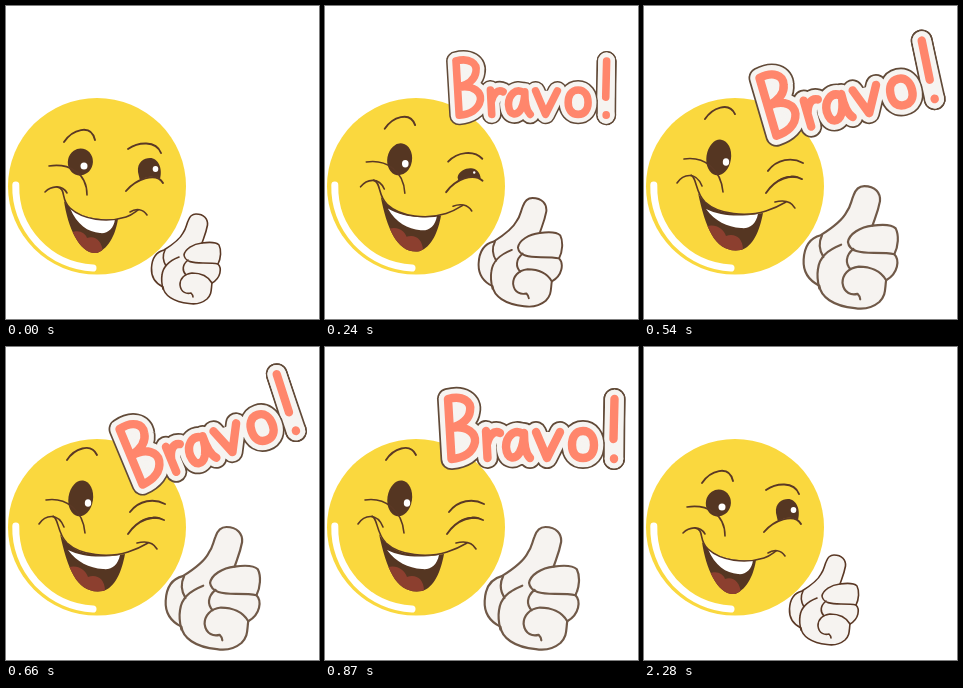
These frames come from a looping animation (313 px wide and 313 px high, 2310 ms). An HTML page:

```html
<!DOCTYPE html>
<html lang="en">
<head>
<meta charset="utf-8">
<title>Bravo!</title>
<style>
  html, body { margin: 0; width: 100%; height: 100%; overflow: hidden; background: #fff; }
  svg { display: block; width: 100vw; height: 100vh; }
  .line { fill: none; stroke: #5a3825; }
  .dark { fill: #553622; }
  path, ellipse { stroke-linecap: round; stroke-linejoin: round; }
</style>
</head>
<body>
<svg viewBox="0 0 313 313" role="img" aria-label="Bravo!">
  <defs>
    <path id="word" d="M123 52L126.500 112M123 52C138 48 147 55 145 64C144 73 136 78 126 81C143 78 151 87 150 95C148 106 138 111 126.500 112
      M161 84L162.500 111M162 97C164 88 169 83 175 86
      M198 87C189 81 181 90 181 100C182 113 190 113 195 105C198 99 199 92 199 86C199 97 200 106 205 111
      M211 85L222 111L235 85
      M258 84C250 84 247 91 247 98C247 106 251 111 258 111C265 111 269 106 269 98C269 90 265 84 258 84Z
      M289.500 52L288.500 92M289 111.500V112"/>
    <g id="plate"><use href="#word"/><path d="M289.500 52L289 112"/></g>
    <clipPath id="mouthClip"><path id="clipShape"/></clipPath>
  </defs>

  <ellipse cx="91" cy="180.3" rx="89" ry="88.3" fill="#fad83e"/>
  <path d="M9.800 179A81 81 0 0 0 87 262" fill="none" stroke="#fff" stroke-width="7"/>

  <ellipse id="eye" class="dark"/>
  <ellipse id="glint" fill="#fff"/>
  <path id="wink" class="dark"/>
  <ellipse id="glint2" fill="#fff"/>
  <path id="mouth" class="dark"/>
  <g clip-path="url(#mouthClip)">
    <path id="tongue" fill="#8c3f2f"/>
    <path id="teeth" fill="#fff"/>
  </g>
  <g class="line" stroke-width="1.6">
    <path id="lip"/>
    <path id="tickL"/>
    <path id="tickR"/>
    <path id="browL" stroke-width="1.9"/>
    <path id="browR" stroke-width="1.9"/>
    <path id="lidL"/>
    <path id="lidR" stroke-width="1.9"/>
  </g>

  <g id="hand" class="line" stroke-width="1.6">
    <path fill="#f6f3f0" d="M182 215C184 209 187 208 190 208C198 208 202 213 201.500 219C200 227 198 231 196 237C203 236 210 236 213 239
      C215.500 244 215 252 212 258C216 262 215 272 206 277C205 284 206 288 201 293C195 298 189 298.500 183 297.500C167 296 158 289 157 281
      C149 277 145 271 145.500 262C146 252 150 246 158 244C166 239 174 233 177 227C180 223 180 220 182 215Z"/>
    <path d="M196 237C187 238 179 243 178 249C179 256 187 257 197 257C203 257 208 257 212 258
      M182 254C176 259 176 265 180 269
      M206 277C202 270 194 267 186 267C178 268 174 273 174 279C175 287 181 288 185 287C186 288 187 290 187 291
      M159 244C156 250 157 255 160 260M173 251C163 255 157 260 156 269C155 275 156 279 157 283"/>
  </g>

  <g id="bravo">
    <use href="#plate" fill="#614a38" stroke="#614a38" stroke-width="22"/>
    <use href="#plate" fill="#f6f4f1" stroke="#f6f4f1" stroke-width="18.6"/>
    <use href="#word" fill="none" stroke="#ff866c" stroke-width="8.4"/>
  </g>
</svg>
<script>
const LOOP = 2310, STEP = 30;
const el = id => document.getElementById(id);
const clamp = x => Math.max(0, Math.min(1, x));
const lerp = (a, b, p) => a + (b - a) * p;
const span = (t, a, b) => clamp((t - a) / (b - a));

// Resting and cheering outlines; each pair has the same commands.
const mouthShape = [
  'M58 195C67 209 86 215 112 213C110 226 104 242 91 247C74 249 62 222 58 195Z',
  'M54 187C64 206 90 212 119 207C116 224 109 241 97 244C72 248 62 224 54 187Z'
];
const shapes = {
  mouth: mouthShape,
  clipShape: mouthShape,
  teeth: [
    'M64 202C76 211 92 215 109 213C108 223 101 228 94 227C82 226 71 219 64 202Z',
    'M62 203C76 210 94 211 114 208C112 218 106 223 97 222C83 221 71 215 62 203Z'
  ],
  tongue: [
    'M64 227C73 223 79 227 81 232C89 229 96 235 97 246L80 252Z',
    'M58 222C69 216 79 221 82 230C90 227 99 231 99 244L82 252Z'
  ],
  lip: [
    'M51 181C61 183 54 193 64 202C77 214 101 217 120 211C126 209 129 206 132 204',
    'M47 169C53 172 51 186 61 196C75 209 103 211 122 205C131 202 137 199 142 196'
  ],
  tickL: [
    'M39 186C45 180 56 178 61 187',
    'M33 177C39 168 52 165 58 180'
  ],
  tickR: [
    'M124 206C130 202 137 203 141 209',
    'M131 196C139 194 147 195 151 202'
  ],
  browL: [
    'M58 136C66 124 85 117 89 134',
    'M61 113C68 102 85 95 91 108'
  ],
  browR: [
    'M122 143C132 136 150 134 155 147',
    'M124 165C133 153 148 151 159 157'
  ],
  lidL: [
    'M43 160C62 157 81 166 81 189',
    'M40 153C60 150 77 163 79 186'
  ],
  lidR: [
    'M120 185C129 174 150 165 157 177',
    'M122 187C132 172 147 168 158 173'
  ],
  wink: [
    'M132 166C131 156 138 152 144 152C152 152 157 162 154 173C147 169 138 171 134 175Z',
    'M133 175C136 172 142 170 146 170C150 169 154 170 157 172C150 171 140 172 133 175Z'
  ]
};

// cx, cy, rx, ry
const ovals = {
  eye: [[75, 156, 12.5, 13.5], [74.5, 151.5, 12.3, 18]],
  glint: [[78, 160, 3.5, 3.5], [82, 156, 3.2, 3.8]],
  glint2: [[149.500, 163, 2.8, 3], [149, 169, 0, 0]]
};

function morph([a, b], p) {
  const to = b.match(/[\d.]+/g);
  let i = 0;
  return a.replace(/[\d.]+/g, n => lerp(+n, +to[i++], p).toFixed(2));
}

function track(keys, t) {
  for (let i = 1; i < keys.length; i++) {
    const [t0, a] = keys[i - 1], [t1, b] = keys[i];
    if (t <= t1) return lerp(a, b, span(t, t0, t1));
  }
  return keys[keys.length - 1][1];
}

const tilt = [[420, 0], [540, -13], [600, -19.5], [630, -22], [750, -11], [870, 0]];

function draw(time) {
  const t = Math.floor((time % LOOP) / STEP) * STEP;
  const leaving = t >= 2070;
  const out = span(t, 2070, 2280);

  const p = leaving ? Math.cos(out * Math.PI / 2)
                    : Math.sin(span(t, 30, 570) * Math.PI / 2);
  for (const id in shapes) el(id).setAttribute('d', morph(shapes[id], p));
  for (const id in ovals) {
    const [a, b] = ovals[id];
    ['cx', 'cy', 'rx', 'ry'].forEach((k, i) => el(id).setAttribute(k, lerp(a[i], b[i], p)));
  }
  el('eye').setAttribute('transform', `rotate(${lerp(12, 8, p)} 75 153)`);

  const hand = el('hand');
  hand.setAttribute('transform',
    `translate(${145 + 14 * p} ${208 - 28 * p}) scale(${1 + 0.365 * p}) translate(-145 -208)`);
  hand.style.stroke = `rgb(${lerp(90, 112, p)}, ${lerp(56, 89, p)}, ${lerp(37, 72, p)})`;

  const size = leaving ? 1 - out ** 1.2 : 1 - (1 - span(t, 30, 270)) ** 1.13;
  const bravo = el('bravo');
  bravo.setAttribute('visibility', size > 0 ? 'visible' : 'hidden');
  bravo.setAttribute('transform',
    `rotate(${track(tilt, t)} 207 95) translate(207 83.5) scale(${size}) translate(-207 -83.5)`);
}

const start = performance.now();
function tick() {
  draw(performance.now() - start);
  requestAnimationFrame(tick);
}
tick();
</script>
</body>
</html>
```
